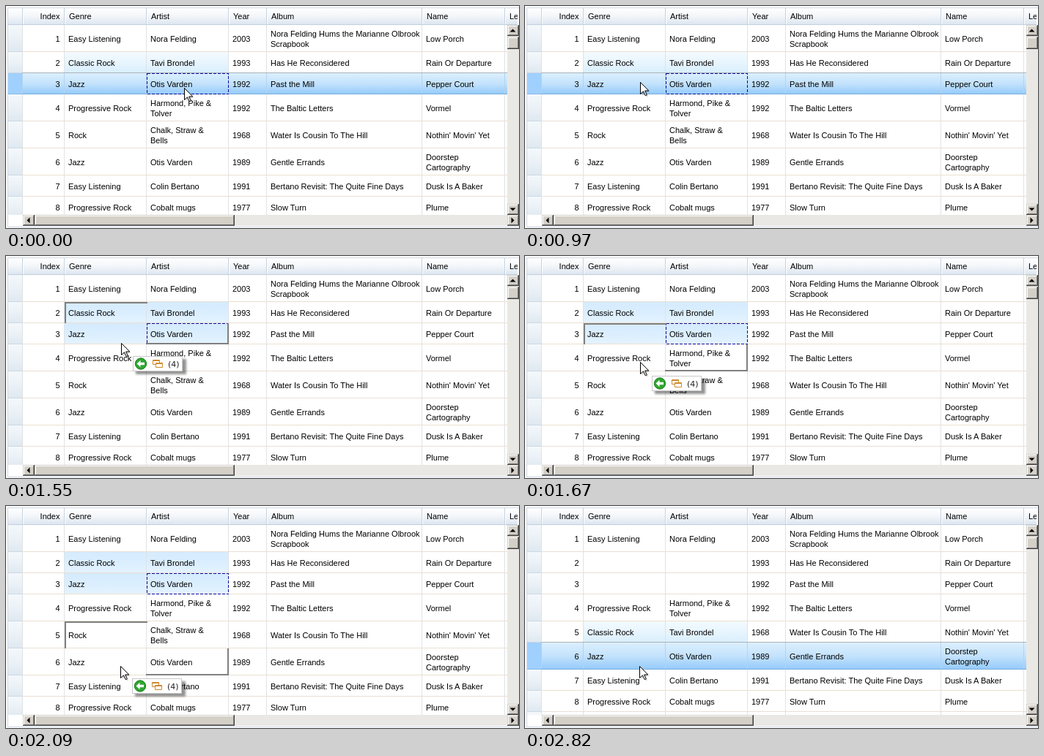
Write an HTML page that moves like this. It is 700 by 304 pixels and loops after 3.95 s.

```html
<!DOCTYPE html>
<html lang="en">
<head>
<meta charset="utf-8">
<title>Dragging cells in a grid</title>
<style>
html, body { margin: 0; width: 100%; height: 100%; overflow: hidden; background: #fff; }
svg { display: block; width: 700px; height: 304px; font: 11px "Liberation Sans", Arial, sans-serif; }
rect, line { shape-rendering: crispEdges; }
text { white-space: pre; }
</style>
</head>
<body>
<svg viewBox="0 0 700 304">
  <defs id="defs">
    <clipPath id="bodyClip"><rect x="3" y="26" width="681" height="260"/></clipPath>
    <clipPath id="headClip"><rect x="3" y="3" width="695" height="23"/></clipPath>
    <filter id="blur" x="-20%" y="-40%" width="140%" height="180%"><feGaussianBlur stdDeviation="1.8"/></filter>
  </defs>
  <g id="frame"></g>
  <g id="grid" clip-path="url(#bodyClip)"></g>
  <g id="bars"></g>
  <g id="popup">
    <rect x="4" y="4" width="69" height="21" fill="#000" opacity=".42" filter="url(#blur)"/>
    <rect x=".5" y=".5" width="67" height="20" fill="#fff" stroke="#c9c9c9"/>
    <circle cx="11" cy="10.5" r="7.7" fill="#2fa52f" stroke="#17801c"/>
    <path d="M5.5 10.5L10.5 5.8V8.8H16V12.2H10.5V15.2Z" fill="#fff"/>
    <g fill="#fff" stroke="#cf8a2c">
      <path d="M27.5 5.5H36.5V11.5H27.5Z"/><path d="M27 6.5H37"/>
      <path d="M31.5 9.5H40.5V15.5H31.5Z"/><path d="M31 10.5H41"/>
    </g>
    <text x="48" y="14.5" font-family="DejaVu Sans, sans-serif" fill="#222">(4)</text>
  </g>
  <g id="cursor">
    <path d="M2.5 2.5V18.5L6.5 14.5 9 20.5 11 19.5 8.5 14H13.5Z" opacity=".16"/>
    <path d="M.5 .5V16.5L4.5 12.8 7.2 18.7 9.3 17.8 6.7 12H11.8Z" fill="#fff" stroke="#000"/>
  </g>
</svg>
<script>
const LOOP = 3950;
const $ = id => document.getElementById(id);

// left edges: marker, index, genre, artist, year, album, name, length
const cols = [3, 22, 79, 191, 303, 355, 567, 680, 792];
const heads = ['', 'Index', 'Genre', 'Artist', 'Year', 'Album', 'Name', 'Length'];
const before = [
  ['Easy Listening', 'Nora Felding', '2003', 'Nora Felding Hums the Marianne Olbrook|Scrapbook', 'Low Porch'],
  ['Classic Rock', 'Tavi Brondel', '1993', 'Has He Reconsidered', 'Rain Or Departure'],
  ['Jazz', 'Otis Varden', '1992', 'Past the Mill', 'Pepper Court'],
  ['Progressive Rock', 'Harmond, Pike &|Tolver', '1992', 'The Baltic Letters', 'Vormel'],
  ['Rock', 'Chalk, Straw &|Bells', '1968', 'Water Is Cousin To The Hill', "Nothin' Movin' Yet"],
  ['Jazz', 'Otis Varden', '1989', 'Gentle Errands', 'Doorstep|Cartography'],
  ['Easy Listening', 'Colin Bertano', '1991', 'Bertano Revisit: The Quite Fine Days', 'Dusk Is A Baker'],
  ['Progressive Rock', 'Cobalt mugs', '1977', 'Slow Turn', 'Plume'],
  ['', '', '', '', '']
];
const after = before.map(r => [...r]);
for (const i of [1, 2]) {
  after[i + 3].splice(0, 2, ...before[i].slice(0, 2));
  after[i].splice(0, 2, '', '');
}

const fills = {
  head: ['#ffffff', '#f3f6fa', '#dde6f0'],
  mark: ['#f4f8fb', '#ebf1f6', '#dfe8f0'],
  focus: ['#dceffe', '#c3e2fc', '#93cafb'],
  press: ['#bcdefe', '#a5d2fd', '#90c6fd'],
  pale: ['#f3faff', '#e8f5fe', '#d9effd'],
  strong: ['#d5ebfe', '#daeefe', '#e4f3ff']
};
for (const [id, c] of Object.entries(fills)) {
  $('defs').innerHTML += `<linearGradient id="${id}" x2="0" y2="1">` +
    c.map((v, i) => `<stop offset="${i / 2}" stop-color="${v}"/>`).join('') + '</linearGradient>';
}

const box = (x, y, w, h, fill) => `<rect x="${x}" y="${y}" width="${w}" height="${h}" fill="${fill}"/>`;
const grad = id => `url(#${id})`;
const esc = s => s.replace(/&/g, '&amp;');
const label = (s, x, y, anchor = 'start') => `<text x="${x}" y="${y}" text-anchor="${anchor}">${esc(s)}</text>`;

function cellText(s, x, mid) {
  const lines = s.split('|');
  return lines.map((l, i) => label(l, x, mid + 5 + 14 * i - 7 * (lines.length - 1))).join('');
}

function measure(data) {
  let y = 26;
  return data.map(r => {
    const h = r.some(s => s.includes('|')) ? 37 : 29;
    y += h;
    return { y: y - h, h };
  });
}

function drawGrid({ data, row, look, cells = [], cellLook, dashed, target }) {
  const spans = measure(data);
  let out = '';
  data.forEach((r, i) => {
    const { y, h } = spans[i], mid = y + Math.floor(h / 2), lit = i === row;
    out += box(3, y, 19, h, lit ? '#a0d0fd' : grad('mark'));
    out += box(3, y + h - 1, 19, 1, lit ? '#86b9e6' : '#cbd8e4');
    out += box(22, y, 662, h, lit ? grad(look) : '#fff');
    if (cells.includes(i)) out += box(80, y, 223, h - 1, grad(cellLook));
    out += box(22, y + h - 1, 662, 1, lit ? '#79aedb' : '#eadfd2');
    for (const x of cols.slice(1, 8)) out += box(x, y, 1, h - 1, lit ? '#b3d3ee' : '#dfe3e6');
    if (lit) out += box(22, y - 1, 662, 1, look === 'press' ? '#8f979f' : '#a9b3b8');
    out += label(i + 1 + '', 73.5, mid + 5, 'end');
    r.forEach((s, c) => { if (s) out += cellText(s, cols[c + 2] + 6, mid); });
  });
  if (dashed) {
    const { y, h } = spans[dashed];
    out += `<rect x="192.5" y="${y + .5}" width="111" height="${h - 1}" fill="none" stroke="#0a0a9c" stroke-dasharray="4 2"/>`;
  }
  if (target !== undefined) {
    const a = spans[target], b = spans[target + 1], end = b.y + b.h - 1;
    out += `<path d="M81 ${a.y + a.h}V${a.y + 1}H193M303 ${b.y}V${end}H191" fill="none" stroke="#808080" stroke-width="2"/>`;
  }
  $('grid').innerHTML = out;
}

function bevel(x, y, w, h) {
  return box(x, y, w, h, '#404040') + box(x, y, w - 1, h - 1, '#d4d0c8') +
    box(x + 1, y + 1, w - 2, h - 2, '#808080') + box(x + 1, y + 1, w - 3, h - 3, '#fff') +
    box(x + 2, y + 2, w - 4, h - 4, '#d4d0c8');
}
const arrow = (x, y, turn) => bevel(x, y, 16, 15) +
  `<path d="M-4 2H4L0 -2Z" transform="translate(${x + 7.5} ${y + 7.5}) rotate(${turn})"/>`;

function drawFrame() {
  let head = box(3, 3, 697, 22, grad('head')) + box(3, 25, 697, 1, '#c3d0de');
  for (const x of cols.slice(1, 8)) head += box(x, 3, 1, 22, '#c6d2df') + box(x + 1, 3, 1, 22, '#fff');
  heads.forEach((s, i) => {
    head += i === 1 ? label(s, 73.5, 18, 'end') : label(s, cols[i] + 7, 18);
  });
  $('frame').innerHTML = box(2, 2, 698, 1, '#cfd9e4') + box(2, 2, 1, 300, '#cfd9e4') +
    box(2, 302, 698, 1, '#cfd9e4') + `<g clip-path="url(#headClip)">${head}</g>`;
  const track = '#eae8e4';
  $('bars').innerHTML = box(684, 26, 16, 260, track) + arrow(684, 26, 0) + bevel(684, 42, 16, 17) +
    arrow(684, 271, 180) + box(23, 286, 677, 15, track) + arrow(23, 286, -90) +
    bevel(39, 286, 273, 15) + arrow(684, 286, 90);
}

const modes = {
  idle: { data: before, row: 2, look: 'focus', cells: [1], cellLook: 'pale', dashed: 2 },
  press: { data: before, row: 2, look: 'press', cells: [1], cellLook: 'pale', dashed: 2 },
  drag: { data: before, cells: [1, 2], cellLook: 'strong', dashed: 2 },
  drop: { data: after, cells: [4, 5], cellLook: 'strong' },
  done: { data: after, row: 5, look: 'focus', cells: [4], cellLook: 'pale' }
};

// time, mode, pointer x and y, popup y
const steps = [
  [0, 'idle', 243, 112],
  [400, 'idle', 251, 118],
  [730, 'idle', 240, 117],
  [790, 'idle', 217, 114],
  [850, 'idle', 190, 109],
  [910, 'idle', 168, 106],
  [970, 'idle', 157, 104],
  [1300, 'press', 157, 104],
  [1430, 'press', 157, 107],
  [1490, 'drag', 157, 111, 129],
  [1550, 'drag', 157, 119, 137],
  [1610, 'drag', 157, 131, 149],
  [1670, 'drag', 157, 145, 164],
  [1730, 'drag', 157, 160, 178],
  [1790, 'drag', 157, 176, 192],
  [1850, 'drag', 157, 190, 207],
  [1910, 'drag', 157, 202, 219],
  [1970, 'drag', 157, 211, 228],
  [2030, 'drag', 156, 217, 234],
  [2090, 'drag', 156, 219, 236],
  [2690, 'drop', 156, 219],
  [2820, 'done', 156, 219]
];
const rowSpans = measure(before);

function show([, mode, x, y, popY]) {
  const state = { ...modes[mode] };
  const dragging = mode === 'drag';
  if (dragging) state.target = rowSpans.findIndex(s => y < s.y + s.h) - 1;
  drawGrid(state);
  $('cursor').setAttribute('transform', `translate(${x} ${y})`);
  $('popup').style.display = dragging ? '' : 'none';
  if (dragging) $('popup').setAttribute('transform', `translate(${x + 16} ${popY})`);
}

let shown, start;
function tick(now) {
  start ??= now;
  const t = (now - start) % LOOP;
  const step = steps.findLast(s => s[0] <= t) || steps[0];
  if (step !== shown) show(shown = step);
  requestAnimationFrame(tick);
}
drawFrame();
show(shown = steps[0]);
requestAnimationFrame(tick);
</script>
</body>
</html>
```
